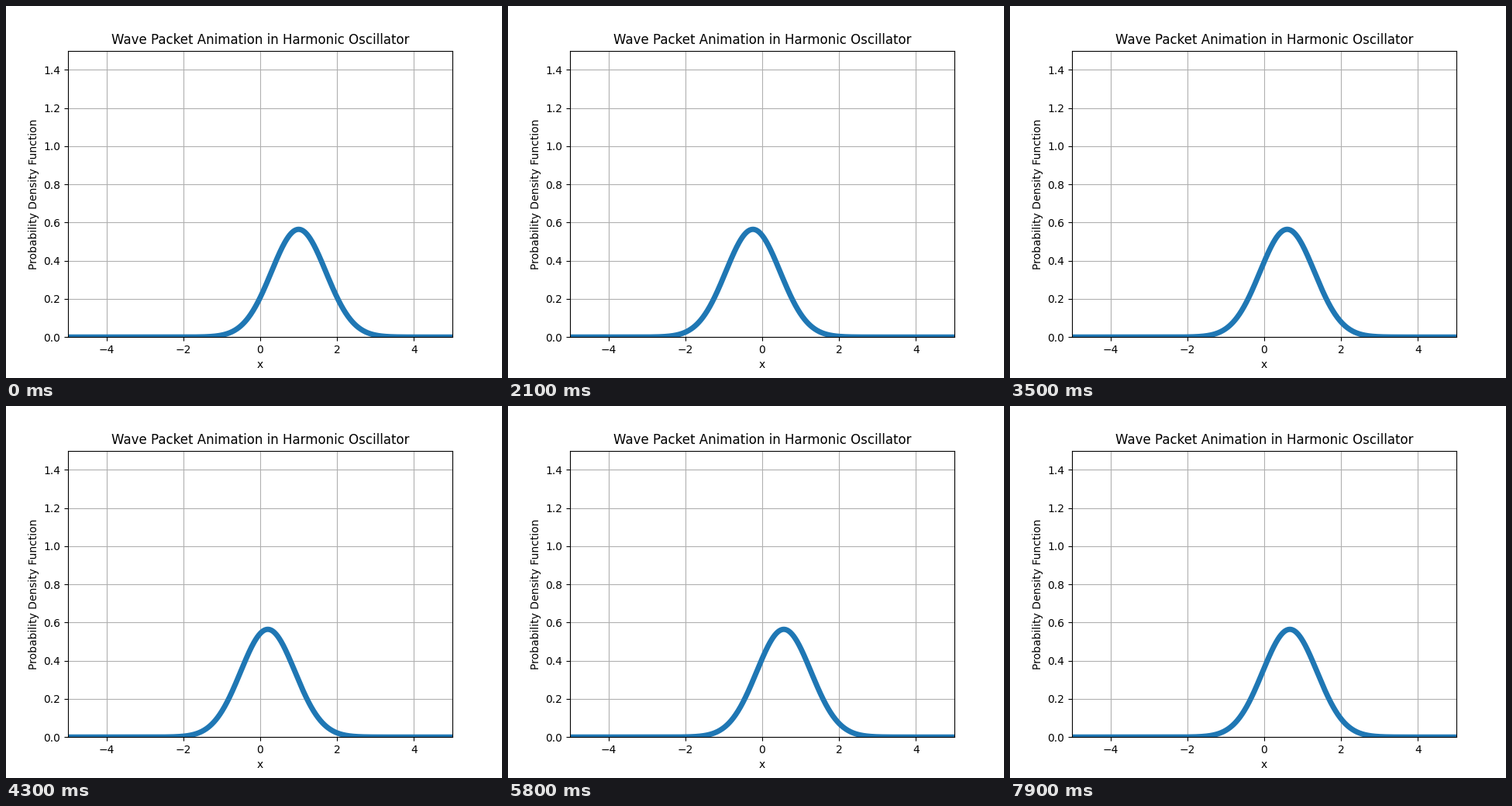
A matplotlib script that plays this animation: 640x480 px, repeating every 8 s.

```python
import numpy as np
import matplotlib.pyplot as plt
from matplotlib.animation import FuncAnimation

FRAMES = 80
INTERVAL = 100   # ms
TIME_STEP = 5.0  # oscillator time per frame, with omega = 1
X0 = 1.0         # initial displacement

plt.rcParams["font.family"] = "DejaVu Sans"

x = np.linspace(-5, 5, 1000)


def density(t):
    """Probability density of a coherent state at time t."""
    center = X0 * np.cos(t)
    return np.exp(-(x - center) ** 2) / np.sqrt(np.pi)


fig, ax = plt.subplots(figsize=(6.4, 4.8), dpi=100)
ax.set_xlim(-5, 5)
ax.set_ylim(0, 1.5)
ax.set_xlabel("x")
ax.set_ylabel("Probability Density Function")
ax.set_title("Wave Packet Animation in Harmonic Oscillator")
ax.grid(True)
line, = ax.plot(x, density(0), lw=5, color="tab:blue")


def update(i):
    line.set_ydata(density(TIME_STEP * i))
    return line,


anim = FuncAnimation(fig, update, frames=FRAMES, interval=INTERVAL,
                     repeat=True, repeat_delay=0)
plt.show()
```
